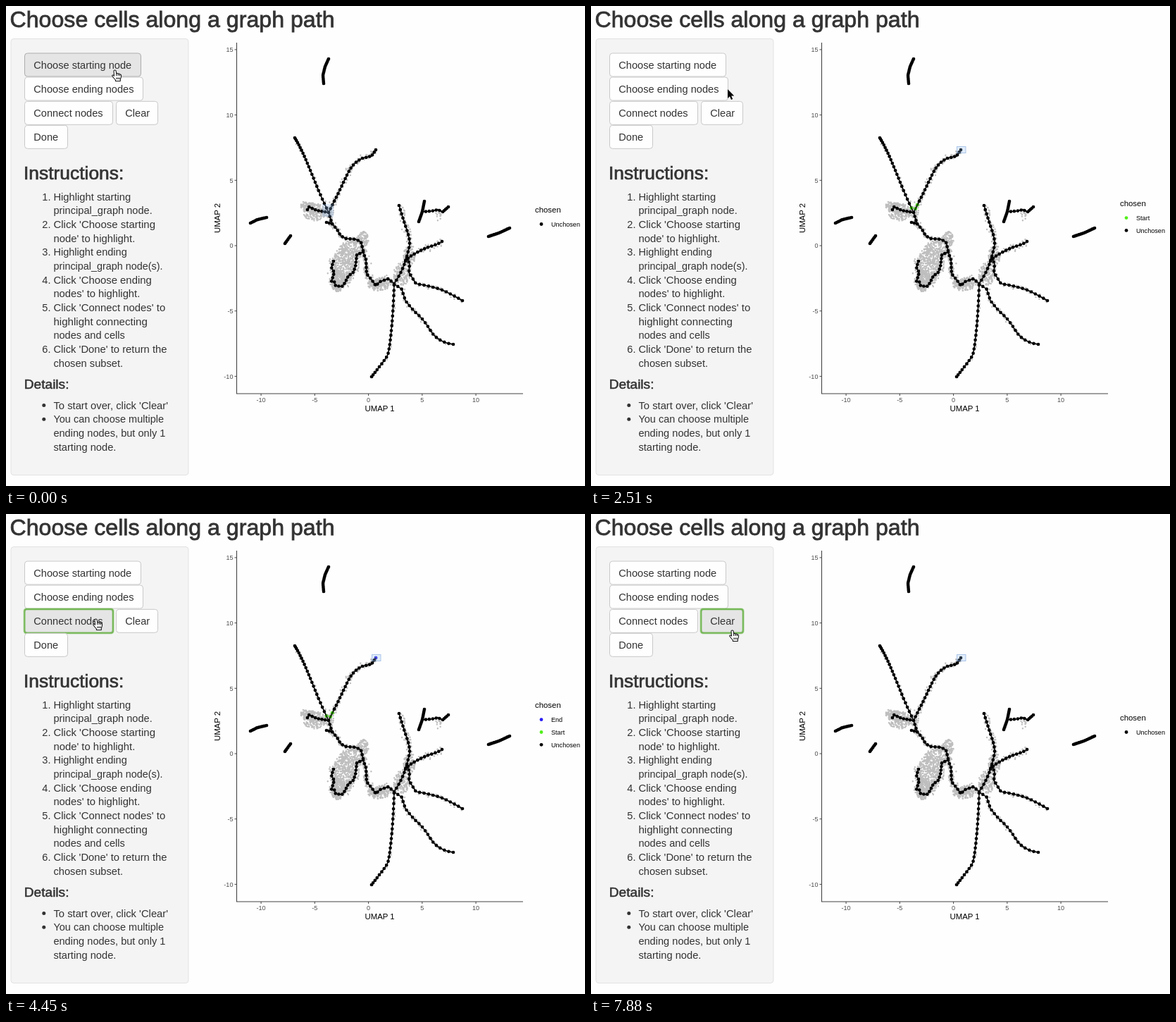
These frames come from a looping animation (822 by 681 pixels, 8000 ms). An HTML page:

```html
<!DOCTYPE html>
<html lang="en">
<head>
<meta charset="utf-8">
<title>Choose cells along a graph path</title>
<style>
  html, body { margin: 0; width: 100%; height: 100%; overflow: hidden; background: #fefefe; }
  svg { display: block; font-family: "Liberation Sans", Arial, sans-serif; fill: none; }
  text { fill: #333; white-space: pre; }
  .dots { stroke-linecap: round; }
</style>
</head>
<body>
<svg id="stage" width="822" height="681" viewBox="0 0 822 681"></svg>
<script>
const LOOP = 8000;
const GREEN = '#51f01a', BLUE = '#2a1df5', PURPLE = '#921cf5', GREY = '#bebebe';
const stage = document.getElementById('stage');

function add(tag, attrs, parent = stage) {
  const el = document.createElementNS('http://www.w3.org/2000/svg', tag);
  for (const k in attrs) el.setAttribute(k, attrs[k]);
  parent.appendChild(el);
  return el;
}
function label(str, x, y, size, attrs = {}, parent = stage) {
  const el = add('text', { x, y, 'font-size': size, ...attrs }, parent);
  el.textContent = str;
  return el;
}
function heading(str, x, y, size, weight) {
  label(str, x, y, size, { stroke: '#333', 'stroke-width': weight });
}
const show = (el, on) => el.setAttribute('visibility', on ? 'visible' : 'hidden');

// ---- Sidebar ----
heading('Choose cells along a graph path', 5.5, 30.3, 32.15, 0.8);
add('rect', { x: 7, y: 46.5, width: 252, height: 619, rx: 4, fill: '#f4f4f4', stroke: '#e2e2e2' });

function button(str, x, y, width) {
  const height = 33;
  const face = add('rect', { x, y, width, height, rx: 4 });
  const ring = add('g', { stroke: '#74b856' });
  const edge = { x: x - 0.3, y: y - 0.3, width: width + 0.8, height: height + 0.8, rx: 3 };
  add('rect', { ...edge, 'stroke-width': 3.6, opacity: 0.4 }, ring);
  add('rect', { ...edge, 'stroke-width': 1.8 }, ring);
  label(str, x + 12.8, y + 22, 14.62);
  return (hover, focus) => {
    const lit = hover || focus;
    face.setAttribute('fill', lit ? '#e5e5e5' : '#fefefe');
    face.setAttribute('stroke', lit ? '#adadad' : '#c9c9c9');
    show(ring, focus);
  };
}
const buttons = {
  start: button('Choose starting node', 26.5, 67, 165),
  end: button('Choose ending nodes', 26.5, 101, 168),
  connect: button('Connect nodes', 26.5, 135.3, 125),
  clear: button('Clear', 156.5, 135.3, 59),
  done: button('Done', 26.5, 169.3, 61)
};

heading('Instructions:', 25, 246, 26.4, 0.7);
const STEP = 19.68;
// an optional leading number opens a new list item
const steps = [
  ['Highlight starting', 14.75, 1], ['principal_graph node.', 14.6],
  ["Click 'Choose starting", 15, 2], ["node' to highlight.", 14.85],
  ['Highlight ending', 14.55, 3], ['principal_graph node(s).', 14.4],
  ["Click 'Choose ending", 14.9, 4], ["nodes' to highlight.", 14.8],
  ["Click 'Connect nodes' to", 14.9, 5], ['highlight connecting', 15.1], ['nodes and cells', 14.6],
  ["Click 'Done' to return the", 14.8, 6], ['chosen subset.', 14.7]
];
steps.forEach(([str, size, num], i) => {
  const y = 275.6 + i * STEP;
  label(str, 67.4, y, size);
  if (num) label(num + '.', 63.5, y, 14.6, { 'text-anchor': 'end' });
});
heading('Details:', 25.8, 543.3, 19.1, 0.5);
const details = [
  ["To start over, click 'Clear'", 14.8, 1], ['You can choose multiple', 14.5, 1],
  ['ending nodes, but only 1', 14.6], ['starting node.', 14.7]
];
details.forEach(([str, size, item], i) => {
  const y = 571.6 + i * STEP;
  label(str, 67.4, y, size);
  if (item) add('circle', { cx: 53.8, cy: y - 5, r: 2.5, fill: '#333' });
});

// ---- Axes ----
add('path', { d: 'M327.5 52V550H734', stroke: '#444', 'stroke-width': 1.1 });
for (let v = -10; v <= 15; v += 5) {
  const y = 340 - v * 18.54;
  add('path', { d: `M324.5 ${y}h3`, stroke: '#444' });
  label(v, 322.5, y + 3.2, 9.1, { 'text-anchor': 'end', style: 'fill:#4d4d4d' });
}
for (let v = -10; v <= 10; v += 5) {
  const x = 514.6 + v * 15.25;
  add('path', { d: `M${x} 550v3`, stroke: '#444' });
  label(v, x, 562.2, 9.1, { 'text-anchor': 'middle', style: 'fill:#4d4d4d' });
}
const axis = { 'text-anchor': 'middle', style: 'fill:#000' };
label('UMAP 1', 530.6, 575, 11.4, axis);
label('UMAP 2', 0, 0, 11.4, { ...axis, transform: 'translate(304 301) rotate(-90)' });

// ---- Cells ----
let seed = 7;
const rand = () => (seed = (seed * 16807) % 2147483647) / 2147483647;
const gauss = () => (rand() + rand() + rand() - 1.5) * 2;
const probe = add('path', { visibility: 'hidden' });
const dot = (x, y) => `M${x.toFixed(1)} ${y.toFixed(1)}h0`;

// evenly filled ellipse
function blob(x, y, rx, ry, n) {
  let d = '';
  while (n--) {
    const r = Math.sqrt(rand()), a = rand() * Math.PI * 2;
    d += dot(x + rx * r * Math.cos(a), y + ry * r * Math.sin(a));
  }
  return d;
}
function along(path, n, spread) {
  probe.setAttribute('d', path);
  const len = probe.getTotalLength();
  let d = '';
  while (n--) {
    const p = probe.getPointAtLength(rand() * len);
    d += dot(p.x + gauss() * spread, p.y + gauss() * spread);
  }
  return d;
}

const armTop = 'M410 187Q420 203 434 238T458 293';
const armEnd = 'M525 204L519 213L506 216Q493 222 486 236T473 263L458 293';
const armLeft = 'M428 289L430 285L441 290L458 293';
const neck = 'M458 293L463 309L470 317L475 326L483 330L497 331L504 335L507 347';
const hook = 'M507 349L498 353L496 370L493 378L486 383L481 393L477 398L468 397L466 391L462 391L466 378L462 371L465 362';
const bridge = 'M507 349L511 360L512 380L521 391L525 397L531 391L543 387L551 394';
const hubUp = 'M551 394Q562 378 567 362T573 338T566 309L558 283';
const hubRight = 'M567 362L573 356Q590 345 603 341T619 334';
const hubLow = 'M569 357L573 366L572 378L582 394Q612 399 624 405T648 418';
const hubDown = 'M551 394L562 402L567 418Q577 431 585 438T603 461T635 480';
const hubTail = 'M519 526Q538 502 541 497T547 461T551 396';

const cells = [
  along(armTop, 30, 1.6), along(armLeft, 70, 3.2), blob(437, 292, 16, 13, 190), blob(426, 283, 8, 6, 50),
  along(neck, 110, 2.4), along(hook, 240, 3.2), blob(479, 365, 15, 22, 300), blob(470, 390, 9, 15, 230),
  blob(491, 344, 17, 12, 150), blob(507, 331, 8, 11, 110), along(bridge, 200, 2.6),
  blob(529, 395, 16, 9, 140), along(hubUp, 150, 2.3), blob(562, 380, 12, 16, 130), blob(573, 354, 9, 14, 80),
  along(hubRight, 70, 2.2), along(hubLow, 60, 2), along(hubDown, 40, 1.7), along(hubTail, 25, 1.5),
  blob(614, 297, 5, 9, 16)
].join('');
const cellStyle = { class: 'dots', stroke: GREY, 'stroke-width': 2.4 };
add('path', { ...cellStyle, d: cells });
const pathCells = add('path', { ...cellStyle, d: along(armEnd, 140, 2) + blob(457, 291, 9, 8, 42) });

// ---- Graph ----
const nodes = [];
let edges = '';
// pow above 1 packs the nodes towards the first end
function branch(path, gap, pow = 1) {
  edges += path;
  probe.setAttribute('d', path);
  const len = probe.getTotalLength(), n = Math.round(len / gap);
  for (let i = 0; i <= n; i++) {
    const p = probe.getPointAtLength(len * (i / n) ** pow);
    nodes.push({ x: p.x, y: p.y, onPath: path === armEnd });
  }
}
branch(armTop, 5.2, 1.35);
branch(armEnd, 5.6, 1.1);
branch(armLeft, 5.2);
branch(neck, 6);
branch('M455 307L463 309', 4);
branch(hook, 5.2);
branch(bridge, 5.6);
branch(hubUp, 6.2);
branch(hubRight, 5.6);
branch(hubLow, 6.4);
branch(hubDown, 6.6);
branch(hubTail, 6.2, 1.2);
branch('M458 75L453 86L450 98L451 110', 1.8);
branch('M347 308L357 303L370 300', 2);
branch('M396 337L404 326', 2);
branch('M685 327L700 322L715 315', 2);
branch('M594 277L591 292L586 306', 2);
branch('M591 292L604 291L613 289L620 292', 5);
branch('M620 292L628 285', 2.5);

const inside = b => n => n.x >= b.x && n.x <= b.x + b.width && n.y >= b.y && n.y <= b.y + b.height;
const startBox = { x: 449.5, y: 281.5, width: 15, height: 17 };
const endBox = { x: 519.5, y: 199.5, width: 12.5, height: 9 };
const plotNodes = (list, stroke, width = 4.7) =>
  add('path', { class: 'dots', stroke, 'stroke-width': width, d: list.map(n => dot(n.x, n.y)).join('') });

plotNodes(nodes, '#000');
const startNodes = plotNodes(nodes.filter(inside(startBox)).filter(n => n.y < 292), GREEN);
const endNodes = plotNodes(nodes.filter(inside(endBox)).filter(n => n.y < 207), BLUE);
const chosenNodes = plotNodes(nodes.filter(n => n.onPath), PURPLE);
add('path', { d: edges, stroke: '#000', 'stroke-width': 1.5, 'stroke-linejoin': 'round' });

const brushStyle = { fill: '#8fbdf0', 'fill-opacity': 0.27, stroke: '#7fa6dc', 'stroke-opacity': 0.6 };
const oldBrush = add('rect', { ...startBox, ...brushStyle, 'stroke-opacity': 0.15 });
const brush = add('rect', { ...endBox, ...brushStyle });

// ---- Legend ----
function legend(items) {
  const g = add('g', {});
  const top = 309.5 - (items.length - 1) * 8.9;
  label('chosen', 751, top - 16.5, 11.4, { style: 'fill:#000' }, g);
  items.forEach(([name, fill], i) => {
    const y = top + i * 17.8;
    add('circle', { cx: 760, cy: y, r: 2.4, fill }, g);
    label(name, 774, y + 3.2, 9.1, { style: 'fill:#000' }, g);
  });
  return g;
}
const rest = ['Unchosen', '#000'], first = ['Start', GREEN];
const legends = {
  plain: legend([rest]),
  start: legend([first, rest]),
  end: legend([['End', BLUE], first, rest]),
  chosen: legend([['Chosen', PURPLE], rest])
};

const dim = add('rect', { x: 19, y: 11, width: 789, height: 539, fill: '#000', opacity: 0.025 });

// ---- Pointer ----
const pointers = {
  hand: add('path', {
    d: 'M-2 1.5C-2 -.5 1 -.5 1.2 1.2L1.7 5C2.2 4 4 4.2 4.2 5.6C5 4.6 6.4 5 6.5 6.3C7.3 5.6 8.6 6.2 8.6 7.6' +
       'C8.7 10.5 8 11.5 7.3 13V15.5H.4V14C-1 12.5 -2.5 10.5 -4.2 8.3C-4.6 6.8 -2.8 6.6 -1.4 8.2Z' +
       'M1.7 5V8M4.2 5.6V8M6.5 6.3V8.3M2 10.5V13M4 10.5V13M6 10.5V13',
    fill: '#fff', stroke: '#111', 'stroke-width': 1.05, 'stroke-linejoin': 'round'
  }),
  arrow: add('path', {
    d: 'M0 0V13L3 10.3L5 15L7.2 14L5.2 9.6H9.3Z',
    fill: '#000', stroke: '#fff', 'stroke-width': 1, 'paint-order': 'stroke'
  }),
  cross: add('path', { d: 'M-7 0H7M0 -7V7', stroke: '#222' })
};

// time, x, y, pointer shape, hovered button
const moves = [
  [0, 155, 91, 'hand', 'start'], [590, 169, 95.5, 'hand', 'start'],
  [740, 199, 108, 'arrow'], [880, 255, 132, 'arrow'], [1030, 338, 164, 'cross'],
  [1180, 425, 187, 'cross'], [1330, 490, 198, 'cross'], [1470, 515, 200, 'cross'], [1620, 520, 200, 'cross'],
  [1770, 526, 204, 'cross'], [1910, 531, 209, 'cross'],
  [2210, 440, 185, 'cross'], [2360, 290, 148, 'cross'], [2510, 194, 118, 'arrow'],
  [2650, 170, 114, 'hand', 'end'], [2950, 161, 112, 'hand', 'end'],
  [4000, 150, 121, 'hand', 'end'], [4150, 137, 138, 'hand', 'connect'], [4300, 128, 149, 'hand', 'connect'],
  [6090, 131, 133, 'hand'], [6240, 152, 122, 'hand', 'end'], [6390, 262, 190, 'arrow'],
  [6540, 362, 246, 'cross'], [6690, 400, 265, 'cross'], [6830, 340, 236, 'cross'],
  [6980, 232, 184, 'arrow'], [7130, 201, 165, 'hand', 'clear']
];
const focuses = [[0, ''], [150, 'start'], [1620, ''], [3100, 'end'], [4450, 'connect'], [7280, 'clear']];
const plots = [[0, 'plain'], [740, 'start'], [3700, 'end'], [5040, 'chosen'], [7880, 'plain']];

const at = (list, t) => list.filter(k => k[0] <= t).pop();

function render(t) {
  const [, x, y, shape, hover] = at(moves, t);
  const focus = at(focuses, t)[1], plot = at(plots, t)[1];

  for (const k in buttons) buttons[k](k === hover, k === focus);
  for (const k in legends) show(legends[k], k === plot);
  for (const k in pointers) show(pointers[k], k === shape);
  pointers[shape].setAttribute('transform', `translate(${x} ${y})`);

  show(startNodes, plot === 'start' || plot === 'end');
  show(endNodes, plot === 'end');
  show(chosenNodes, plot === 'chosen');
  pathCells.setAttribute('stroke', plot === 'chosen' ? PURPLE : GREY);

  show(oldBrush, t < 1620);
  show(brush, t >= 1770);
  const part = t < 1910 ? 0.5 : 1;
  brush.setAttribute('width', endBox.width * part);
  brush.setAttribute('height', endBox.height * part);

  show(dim, (t >= 590 && t < 740) || (t >= 3250 && t < 3700));
}

const began = performance.now();
function tick() {
  render((performance.now() - began) % LOOP);
  requestAnimationFrame(tick);
}
tick();
</script>
</body>
</html>
```
